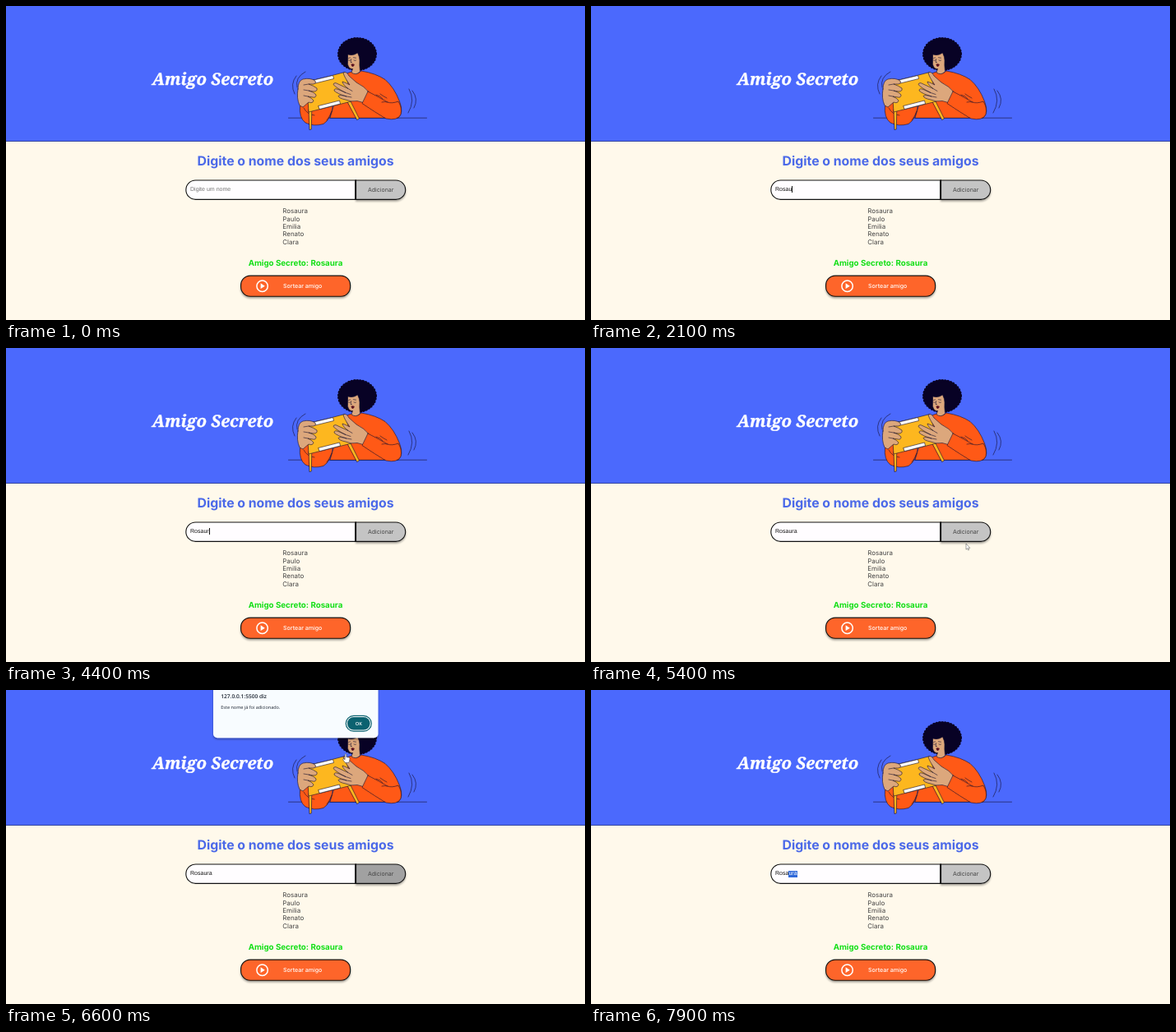
These frames come from a looping animation (704 px wide and 382 px high, 8000 ms). An HTML page:

```html
<!DOCTYPE html>
<html lang="pt-BR">
<head>
<meta charset="utf-8">
<title>Amigo Secreto</title>
<style>
  html, body { margin: 0; width: 100%; height: 100%; overflow: hidden; background: #fff9eb; }
  svg { position: absolute; left: 0; top: 0; display: block; }
  text, #field { text-rendering: geometricPrecision; }
  .inter { font-family: Inter, sans-serif; }
  .dialog-text { font-family: "Open Sans", sans-serif; }
  .ink { stroke: #16102e; stroke-width: .6; stroke-linejoin: round; stroke-linecap: round; }
  .line { fill: none; }
  .skin { fill: #dca77c; }
  .orange { fill: #ff5916; }
  .yellow { fill: #fdb71f; }
  .paper { fill: #fff; }
  #field {
    position: absolute; left: 224px; top: 218px; height: 12px;
    font: 7.04px/12px "Liberation Sans", Arial, sans-serif; white-space: pre; color: #111;
  }
  #field.empty { color: #757575; }
  #selected { display: inline-block; height: 8px; line-height: 8px; background: #2f69d9; color: #fff; }
  #caret { display: inline-block; width: .8px; height: 8px; margin-right: -.8px; background: #111; vertical-align: -1.5px; }
</style>
</head>
<body>
<svg width="704" height="382" viewBox="0 0 704 382">
  <defs>
    <filter id="shadow" x="-10%" y="-20%" width="120%" height="160%">
      <feDropShadow dx="0" dy="1.8" stdDeviation="1.1" flood-opacity=".35"/>
    </filter>
  </defs>

  <rect width="704" height="165" fill="#4b69fd"/>
  <rect y="164" width="704" height="1" fill="#33459f"/>
  <text x="251.5" y="96" text-anchor="middle" font-family="'Noto Serif', serif" font-size="20.3"
        font-weight="700" font-style="italic" fill="#fff" stroke="#fff" stroke-width=".35">Amigo Secreto</text>

  <g id="illustration" class="ink">
    <path class="line" d="M343.500 136.200H511.500"/>
    <!-- torso and far sleeve -->
    <path class="orange" d="M394 136L401 112L409 85Q416 81 420 80Q426 85 432 79Q450 82 461 89.500Q472 99 478.500 116Q484 130 477 136Z"/>
    <path class="orange" d="M357.500 121Q356 136 364 142Q374 147 386 143.500Q396 137 397.500 120L380 112Z"/>
    <path class="line" d="M362 124Q366 132 375 133M390 139Q394 134 396 128"/>
    <!-- head -->
    <ellipse cx="427" cy="58.500" rx="22" ry="18.500" fill="#080225" stroke="none"/>
    <ellipse cx="427" cy="58.500" rx="22" ry="18.500" fill="none" stroke="#080225" stroke-width="4.200" stroke-dasharray="0 3.400"/>
    <path class="skin" d="M415.800 59Q422 61 427.500 57Q430 62 430 66Q429.500 72 430.500 79.500Q426 85 420 81L421.500 76.500Q417 77 415.500 71Z"/>
    <path class="line" d="M416.500 63.500L418.500 62.800M422.500 62.700L425.500 63.200M416.500 66Q417.700 66.800 418.700 66M423 66Q424.300 67 425.500 66.200M419.800 64.500L419 68.500H420.500"/>
    <path d="M419.500 70.800Q421.500 69.700 423.800 71Q423.300 74 421.500 74Q419.700 73.500 419.500 70.800Z" fill="#5b1220" stroke="none"/>
    <!-- parcel -->
    <path class="yellow" d="M368.300 126L371.800 125.500L371.300 150L369.300 150.500Z"/>
    <path class="yellow" d="M413.500 113L417 112L429.500 137L427 138.500Z"/>
    <path class="yellow" d="M363 92.500Q388 87 412 80.500Q418 98 420 116Q394 122.500 368 129Q368 110 363 92.500Z"/>
    <path class="paper" d="M372.500 90.500L397.500 84.500L398.500 88.500L374 94.500Z"/>
    <path class="paper" d="M380 121.500L405.500 115L406.500 119L381.500 125.500Z"/>
    <!-- left hand -->
    <path class="skin" d="M355 101Q355 91 361 89Q370 87 376 91Q378 94 374 95L368 95Q374 97 378 100Q379 104 374 104L368 103Q375 105 377 108Q377 112 373 111L367 110Q372 112 374 115Q373 119 368 117L361 123L357 121Q353 112 355 101Z"/>
    <path class="line" d="M368 95L362 96M368 103L362 102M367 110L362 109"/>
    <!-- right hand and forearm -->
    <path class="skin" d="M436 118L427 115.500Q419 117 413 114Q405 112.500 404 109.500Q406 107.500 414 110Q403 107 399 103Q399 99.500 404 101.500L413 105.500Q402 100 398 95.500Q399 92 404 95L416 100.500Q409 95 409 92L413 93.500L418 96Q411 86 410 81Q414 79 417 85L426 93Q436 98 441 104.500Z"/>
    <path class="line" d="M414 110L420 111M413 105.500L419 107.500M416 100.500L421 103.500"/>
    <path class="orange" d="M440 104L433 118.500Q450 130 462 137Q476 140 480 132Q482 124 477 116Q469 119 464 117Q452 110 440 104Z"/>
    <path class="line" d="M450 108Q455 109 458 113M455 107Q459 110 463 112M464 117Q460 116 457 117"/>
    <!-- shake marks -->
    <path class="line" d="M351 107Q345 95 353 85M354 99Q351 87 364 80M490 101Q498 115 489 130M494 103Q502 113 496 124"/>
  </g>

  <g class="inter">
    <text x="352" y="194.200" text-anchor="middle" font-size="15.840" font-weight="700" fill="#4b69e8">Digite o nome dos seus amigos</text>
    <path d="M425 212H230.500A11.700 11.700 0 0 0 230.500 235.400H425Z" fill="#fffdff" stroke="#111" stroke-width="1.100"/>
    <path id="add" d="M425.500 212H474A11.700 11.700 0 0 1 474 235.400H425.500Z" stroke="#111" stroke-width="1.100" filter="url(#shadow)"/>
    <path d="M425.200 211.500V236" stroke="#111" stroke-width="1.700"/>
    <text x="455.700" y="226.300" text-anchor="middle" font-size="7.040" fill="#444">Adicionar</text>
    <g id="names" font-size="7.950" fill="#444"></g>
    <text x="352" y="316" text-anchor="middle" font-size="9.750" font-weight="700" fill="#12df16">Amigo Secreto: Rosaura</text>
    <rect x="285.600" y="328.100" width="133" height="25.200" rx="11.500" fill="#fe652b" stroke="#111" stroke-width="1.100" filter="url(#shadow)"/>
    <circle cx="311.600" cy="340.700" r="6.700" fill="none" stroke="#fff" stroke-width="1.500"/>
    <path d="M309.600 337.300V344.100L314.800 340.700Z" fill="#fff"/>
    <text x="360.700" y="343.300" text-anchor="middle" font-size="7.040" font-weight="500" fill="#fff">Sortear amigo</text>
  </g>
</svg>

<div id="field"><span id="plain"></span><span id="selected"></span><i id="caret"></i></div>

<svg width="704" height="382" viewBox="0 0 704 382">
  <g id="dialog" class="dialog-text">
    <rect x="252" y="-10" width="200.500" height="68.300" rx="5" fill="#f8fcff" filter="url(#shadow)"/>
    <text x="261.300" y="10" font-size="6.600" font-weight="600" fill="#1c2430">127.0.0.1:5500 diz</text>
    <text x="261.300" y="22.700" font-size="5.500" fill="#1c2430">Este nome já foi adicionado.</text>
    <rect id="ring" x="413.300" y="31.300" width="31" height="18.800" rx="9.400" fill="#fff" stroke="#0b6270" stroke-width="1.200"/>
    <rect id="ok" x="415" y="33" width="27.600" height="15.400" rx="7.700"/>
    <text x="428.800" y="42.800" text-anchor="middle" font-size="5.700" font-weight="600" fill="#fff">OK</text>
  </g>
  <g id="cursor" stroke-linejoin="round" stroke-width=".5">
    <path id="arrow" d="M0 0V7.200L1.600 5.800L2.600 8L3.700 7.500L2.700 5.300H4.800Z" fill="#fff" stroke="#444"/>
    <path id="hand" d="M-.900 .800Q0 -.600 .900 .800V4.200Q1.800 3.400 2.500 4.400Q3.400 3.700 4 4.800Q5 4.500 5 5.800Q5 9 3.600 11H-.600L-3.300 7.300Q-3.400 5.800 -2 6.300L-.900 7.300Z" fill="#fff" stroke="#223"/>
    <path id="beam" d="M-1 -3.500H1M0 -3.500V3.500M-1 3.500H1" fill="none" stroke="#333"/>
  </g>
</svg>

<script>
const LOOP = 8000, STEP = 100;
const $ = id => document.getElementById(id);
const show = (id, visible) => { $(id).style.display = visible ? '' : 'none'; };
const within = (t, from, to) => t >= from && t < to;

['Rosaura', 'Paulo', 'Emilia', 'Renato', 'Clara'].forEach((name, i) => {
  const line = document.createElementNS('http://www.w3.org/2000/svg', 'text');
  line.setAttribute('x', 336.3);
  line.setAttribute('y', 252.2 + i * 9.38);
  line.textContent = name;
  $('names').append(line);
});

// [time, field value]
const typing = [
  [0, ''], [1200, 'R'], [1500, 'Ro'], [1700, 'Ros'], [1900, 'Rosa'], [2100, 'Rosau'],
  [2300, 'Rosaux'], [3100, 'Rosauxr'], [3300, 'Rosauxra'], [4100, 'Rosauxr'],
  [4200, 'Rosaux'], [4300, 'Rosau'], [4400, 'Rosaur'], [4500, 'Rosaura']
];
// [time, x, y]
const path = [
  [5200, 418, 262], [5400, 456, 238], [5600, 456, 224], [6300, 455, 222],
  [6600, 413, 77.5], [6900, 423, 43], [7200, 424, 40.5], [7300, 415, 62],
  [7600, 256, 220], [7700, 251, 223]
];

function pointerAt(t) {
  const next = path.findIndex(p => p[0] > t);
  if (next < 0) return path.at(-1).slice(1);
  const [t0, x0, y0] = path[Math.max(0, next - 1)], [t1, x1, y1] = path[next];
  const k = t1 > t0 ? (t - t0) / (t1 - t0) : 0;
  return [x0 + (x1 - x0) * k, y0 + (y1 - y0) * k];
}

function drawField(t) {
  const [since, value] = typing.findLast(entry => entry[0] <= t);
  const split = t >= 7900 ? 4 : value.length;
  $('field').className = value ? '' : 'empty';
  $('plain').textContent = value ? value.slice(0, split) : 'Digite um nome';
  $('selected').textContent = value.slice(split);
  show('selected', split < value.length);
  const blinkOn = value && (t - since) % 1100 < 600;
  show('caret', t < 5700 ? blinkOn : within(t, 7700, 7900));
}

function drawDialog(t) {
  const opening = t < 5900, closing = t >= 7200;
  show('dialog', within(t, 5800, 7300));
  show('ring', !closing);
  $('dialog').setAttribute('opacity', closing ? .32 : opening ? .5 : 1);
  $('dialog').setAttribute('transform', `translate(0 ${closing ? -6 : opening ? -3 : 0})`);
  $('ok').setAttribute('fill', closing ? '#003a9a' : '#0b6270');
}

function drawCursor(t) {
  const [x, y] = pointerAt(t);
  const beam = t >= 7300 && y > 212, hand = within(t, 5500, 7300);
  show('cursor', within(t, 5200, 7900));
  show('beam', beam);
  show('hand', hand);
  show('arrow', !beam && !hand);
  $('cursor').setAttribute('transform', `translate(${x} ${y})`);
}

function frame(now) {
  const t = Math.floor(now % LOOP / STEP) * STEP;
  drawField(t);
  drawDialog(t);
  drawCursor(t);
  $('add').setAttribute('fill', within(t, 5500, 7200) ? '#a1a1a1' : '#c4c4c4');
  requestAnimationFrame(frame);
}
frame(0);
</script>
</body>
</html>
```
